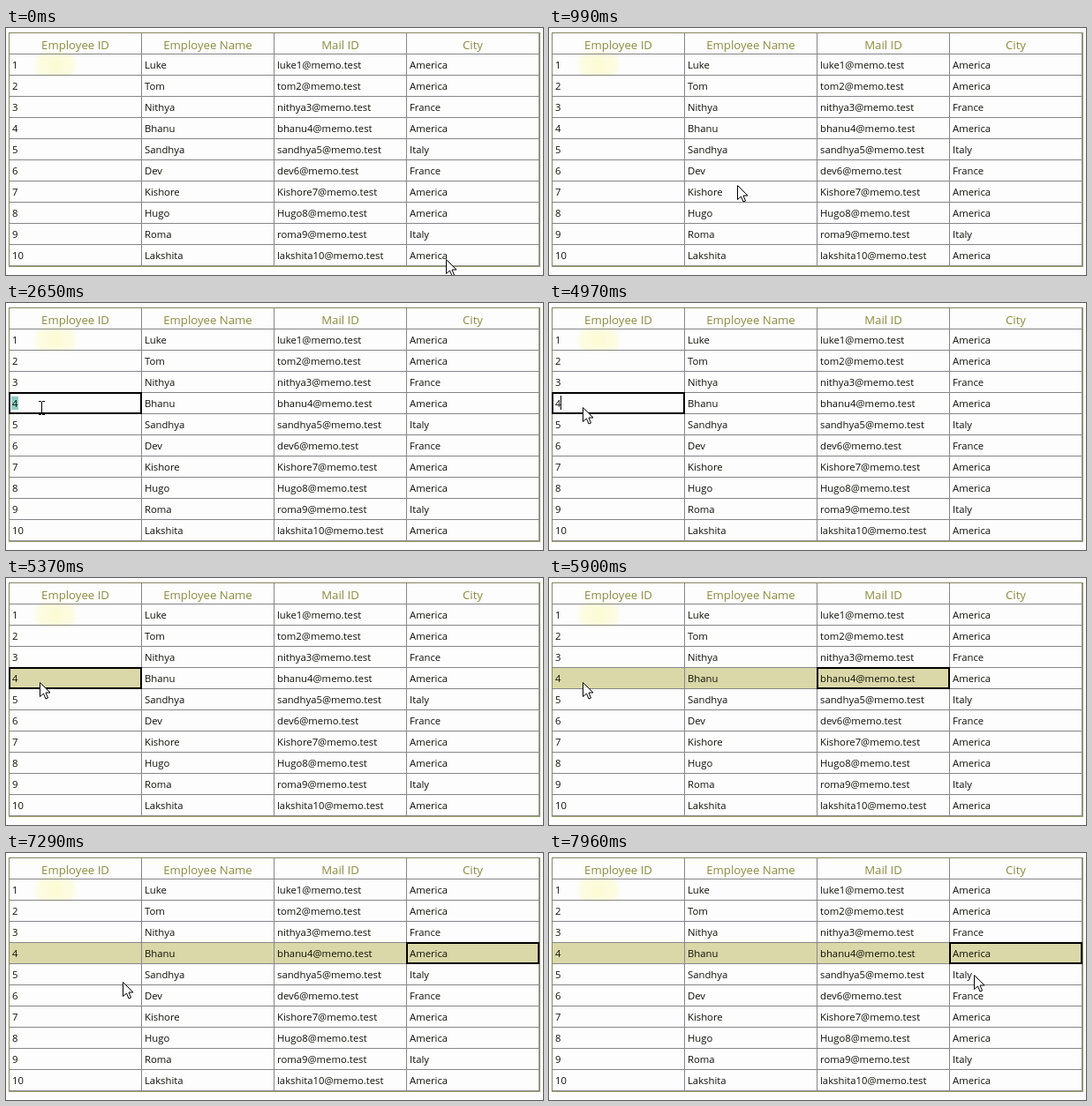
An HTML page with a canvas that plays this animation: 608x280 px, repeating every 8000 ms.

```html
<!DOCTYPE html>
<html lang="en">
<head>
<meta charset="utf-8">
<title>Data grid selection</title>
<style>
  html, body { margin: 0; width: 100%; height: 100%; overflow: hidden; background: #fdfdfe; }
  canvas { display: block; }
</style>
</head>
<body>
<canvas id="stage" width="608" height="280"></canvas>
<script>
const ctx = document.getElementById('stage').getContext('2d');
const LOOP = 8000;
const LEFT = 3, TOP = 5, HEAD = 29, COL = 150, ROW = 24;
const RIGHT = LEFT + COL * 4, BOTTOM = HEAD + ROW * 10;
const ACTIVE_Y = HEAD + ROW * 3;
const FONT = '"Open Sans", "Noto Sans", sans-serif';
const PAPER = '#fdfdfe', INK = '#101008', GRID = '#86868a', OLIVE = '#8c8c3c';

const headers = ['Employee ID', 'Employee Name', 'Mail ID', 'City'];
const people = [
  ['Luke', 'luke', 'America'], ['Tom', 'tom', 'America'],
  ['Nithya', 'nithya', 'France'], ['Bhanu', 'bhanu', 'America'],
  ['Sandhya', 'sandhya', 'Italy'], ['Dev', 'dev', 'France'],
  ['Kishore', 'Kishore', 'America'], ['Hugo', 'Hugo', 'America'],
  ['Roma', 'roma', 'Italy'], ['Lakshita', 'lakshita', 'America']
];
const rows = people.map(([name, box, city], i) =>
  [String(i + 1), name, `${box}${i + 1}@memo.test`, city]);

// Each step holds from its time until the next one.
const states = [
  { at: 0 },
  { at: 2250, cells: 1 },
  { at: 2590, edit: true, marked: true },
  { at: 3780, edit: true, caret: true },
  { at: 4310, edit: true },
  { at: 4840, edit: true, caret: true },
  { at: 5110, cells: 1 },
  { at: 5570, cells: 2 },
  { at: 5840, cells: 3 },
  { at: 6100, cells: 4 }
];

// Pointer tip: time, x, y.
const path = [
  [0, 498, 262], [600, 498, 262], [730, 440, 244], [930, 260, 190],
  [1190, 87, 146], [1330, 87, 146], [1520, 27, 120], [1930, 27, 120],
  [1990, 23, 118], [2640, 23, 118], [2650, 38, 118], [7030, 38, 118],
  [7160, 62, 132], [7360, 190, 157], [7560, 350, 152], [7760, 462, 140],
  [7890, 481, 138], [LOOP, 481, 138]
];

function pointerAt(time) {
  const tick = time < 1930 || time > 7000 ? Math.floor(time / 66) * 66 + 10 : time;
  const t = Math.min(tick, LOOP - 1);
  const i = path.findIndex(p => p[0] > t);
  const [t0, x0, y0] = path[i - 1], [t1, x1, y1] = path[i];
  const k = (t - t0) / (t1 - t0);
  if (t1 === 2650) return [x0, y0];
  return [Math.round(x0 + (x1 - x0) * k), Math.round(y0 + (y1 - y0) * k)];
}

function box(color, x, y, w, h) {
  ctx.fillStyle = color;
  ctx.fillRect(x, y, w, h);
}

function drawGlow() {
  const glow = ctx.createRadialGradient(56, 42, 4, 56, 42, 27);
  glow.addColorStop(0, '#fcfbd6');
  glow.addColorStop(0.7, '#fdfce4');
  glow.addColorStop(1, 'rgba(253,253,244,0)');
  box(glow, 29, 27, 54, 28);
}

function drawGrid() {
  for (let c = 0; c <= 4; c++) box(GRID, LEFT + c * COL, TOP, 1, BOTTOM - TOP);
  for (let r = 0; r <= 10; r++) box(GRID, LEFT, HEAD + r * ROW, RIGHT - LEFT + 1, 1);
  box('#858560', LEFT, TOP, RIGHT - LEFT + 1, 1);
  box('#858560', LEFT, TOP, 1, BOTTOM - TOP + 1);
  box('#a2a26c', RIGHT + 1, TOP, 1, BOTTOM - TOP + 2);
  box('#a2a26c', LEFT, BOTTOM + 1, RIGHT - LEFT + 2, 1);
}

function drawText() {
  ctx.save();
  ctx.beginPath();
  ctx.rect(0, 0, 608, 27);
  ctx.clip();
  ctx.font = `13.2px ${FONT}`;
  ctx.textAlign = 'center';
  ctx.fillStyle = OLIVE;
  headers.forEach((label, c) => ctx.fillText(label, LEFT + c * COL + 75.5, 24));
  ctx.restore();

  ctx.font = `11.3px ${FONT}`;
  ctx.textAlign = 'left';
  ctx.fillStyle = INK;
  rows.forEach((cells, r) => cells.forEach((text, c) =>
    ctx.fillText(text, LEFT + 4 + c * COL, 46 + r * ROW)));
}

function drawFocus(col) {
  ctx.strokeStyle = '#000';
  ctx.lineWidth = 2;
  ctx.strokeRect(LEFT + col * COL + 1, ACTIVE_Y + 1, COL - 1, ROW - 1);
}

function drawArrow(x, y) {
  ctx.save();
  ctx.translate(x + 0.5, y + 0.5);
  const shape = new Path2D('M0 0V16L4 12.5L6.5 18.5L9 17.5L6.5 11.5H11.5Z');
  ctx.fillStyle = '#fff';
  ctx.fill(shape);
  ctx.strokeStyle = '#000';
  ctx.lineWidth = 1;
  ctx.stroke(shape);
  ctx.restore();
}

function drawBeam(x, y) {
  box('#000', x, y + 1, 1, 14);
  for (const end of [y, y + 15]) {
    box('#000', x - 3, end, 3, 1);
    box('#000', x + 1, end, 3, 1);
  }
}

function draw(time) {
  const state = states.filter(s => s.at <= time).pop();
  box(PAPER, 0, 0, 608, 280);
  drawGlow();
  if (state.cells) box('#dad8a8', LEFT + 1, ACTIVE_Y + 1, state.cells * COL, ROW - 1);
  if (state.marked) box('#8fcfc3', 6, 106, 8, 15);
  drawGrid();
  drawText();
  if (state.cells) drawFocus(state.cells - 1);
  if (state.edit) drawFocus(0);
  if (state.caret) box('#000', 13, 105, 1, 16);
  if (time >= 2650 && time < 4900) drawBeam(40, 111);
  else drawArrow(...pointerAt(time));
}

const start = performance.now();
function frame() {
  draw((performance.now() - start) % LOOP);
  requestAnimationFrame(frame);
}
frame();
</script>
</body>
</html>
```
